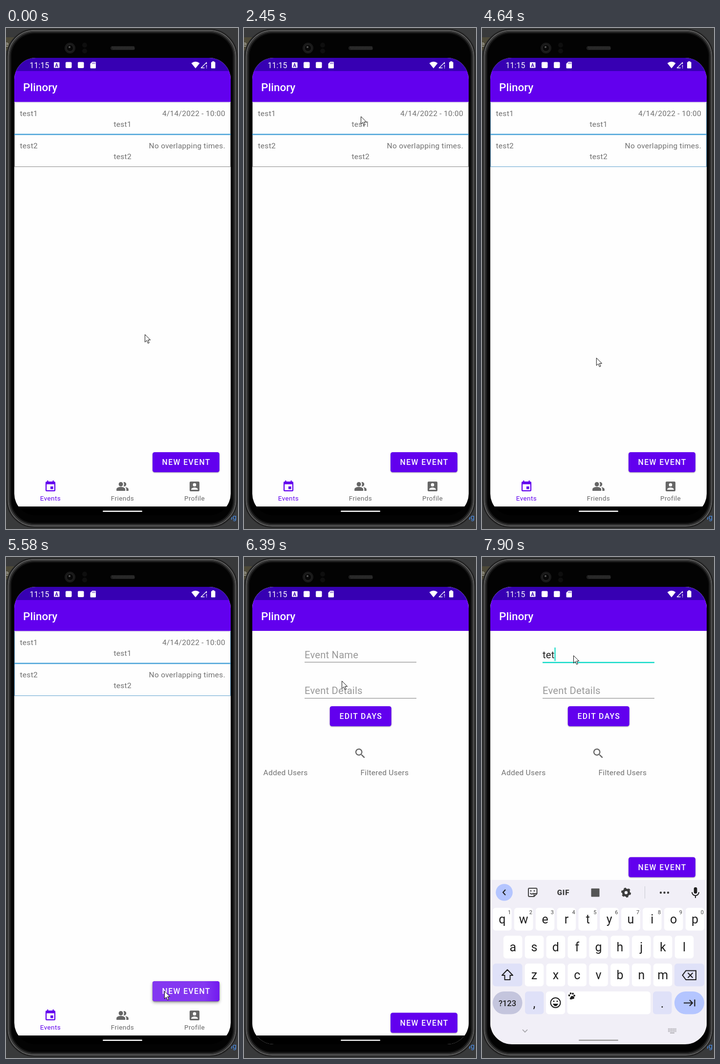
Animation of 475 by 1024 pixels, one loop 8000 ms. Source, as an HTML page:

```html
<!DOCTYPE html>
<html lang="en">
<head>
<meta charset="utf-8">
<title>Event planner demo</title>
<style>
html, body { margin: 0; width: 100%; height: 100%; overflow: hidden; background: #393a3b; }
svg { display: block; width: 475px; height: 1024px; font-family: Roboto, "Noto Sans", sans-serif; }
text { white-space: pre; }
.body { font-size: 15.5px; letter-spacing: .28px; fill: #717171; }
.title { font-size: 22.5px; font-weight: 500; fill: #fff; }
.field { font-size: 20.2px; letter-spacing: .2px; fill: #999; }
.caps { font-size: 15.8px; font-weight: 500; letter-spacing: 1.4px; fill: #fff; }
.tab { font-size: 13.5px; letter-spacing: .42px; text-anchor: middle; }
.key { font-size: 25px; text-anchor: middle; fill: #1f1f1f; }
.num { font-size: 11px; text-anchor: middle; fill: #444; }
.mid { text-anchor: middle; }
.end { text-anchor: end; }
</style>
</head>
<body>
<svg id="stage" viewBox="0 0 475 1024"></svg>
<script>
const LOOP = 8000;
const PURPLE = '#6200ee', DARK = '#3700b3', TEAL = '#03d8c4', INK = '#1f1f1f', GREY = '#666';
const APP = 'Plinory';

const rect = (x, y, w, h, fill, r = 0, more = '') =>
  `<rect x="${x}" y="${y}" width="${w}" height="${h}" rx="${r}" fill="${fill}" ${more}/>`;
const circle = (x, y, r, fill, more = '') => `<circle cx="${x}" cy="${y}" r="${r}" fill="${fill}" ${more}/>`;
const text = (x, y, s, cls, more = '') => `<text x="${x}" y="${y}" class="${cls}" ${more}>${s}</text>`;
const line = (d, color, w = 2, more = '') => `<path d="${d}" fill="none" stroke="${color}" stroke-width="${w}" ${more}/>`;
const shape = (d, fill, more = '') => `<path d="${d}" fill="${fill}" ${more}/>`;
const group = (id, s, more = '') => `<g id="${id}" ${more}>${s}</g>`;
const shadow = (dy, blur, color) => `style="filter:drop-shadow(0 ${dy}px ${blur}px ${color})"`;
// Icons are drawn on a 24 unit grid around their centre.
const icon = (x, y, d, fill) =>
  shape(d, fill, `fill-rule="evenodd" transform="translate(${x} ${y}) scale(1.12) translate(-12 -12)"`);

const ICON = {
  event: 'M17 12h-5v5h5zM16 1v2H8V1H6v2H5a2 2 0 0 0-2 2v14a2 2 0 0 0 2 2h14a2 2 0 0 0 2-2V5a2 2 0 0 0-2-2h-1V1zM19 19H5V8h14z',
  people: 'M16.7 13.1C18 14 19 15.3 19 17v3h4v-3c0-2.2-3.6-3.5-6.3-3.9zM15 12a4 4 0 1 0-1.3-7.8Q15 5.9 15 8t-1.3 3.8zM9 12a4 4 0 1 0 0-8 4 4 0 0 0 0 8zM9 13c-2.7 0-8 1.3-8 4v3h16v-3c0-2.7-5.3-4-8-4z',
  person: 'M5 3h14a2 2 0 0 1 2 2v14a2 2 0 0 1-2 2H5a2 2 0 0 1-2-2V5a2 2 0 0 1 2-2zM12 6a3 3 0 1 0 0 6 3 3 0 0 0 0-6zM6 17v1h12v-1c0-2-4-3.1-6-3.1s-6 1.1-6 3.1z',
  search: 'M15.5 14h-.8l-.3-.3A6.5 6.5 0 1 0 13.7 14.4l.3.3v.8l5 5 1.5-1.5zM9.5 14a4.5 4.5 0 1 1 0-9 4.5 4.5 0 0 1 0 9z'
};

const button = (x, y, w, s, overlay = '') =>
  rect(x, y, w, 41, PURPLE, 4.5, shadow(1, 1, '#0005')) + overlay +
  text(x + w / 2 + .7, y + 26.3, s, 'caps mid');

const topBar = () =>
  rect(17, 61, 443, 28, DARK) + rect(17, 88, 443, 63, PURPLE) + text(35, 129, APP, 'title');

function device() {
  const shell = (i, fill, stroke, w) =>
    rect(2 + i, 2.5 + i, 471 - 2 * i, 1018 - 2 * i, fill, 56 - i, `stroke="${stroke}" stroke-width="${w}"`);
  let grille = '';
  for (let x = 218; x < 262; x += 3) grille += line(`M${x} 38l2 6`, '#3d3d3d', 1);
  return rect(0, 0, 475, 1024, '#393a3b') + rect(0, 19, 20, 27, '#4d4938') +
    text(-2, 38, 'e', '', 'font-size="14" fill="#b9b9b0"') +
    text(460, 1005, 'ig', '', 'font-size="15" fill="#4c8ee6"') +
    shell(0, '#111', '#262626', 2) + shell(2.5, '#0b0b0b', '#777', 1.5) +
    shell(5, '#070707', '#353535', 3) + shell(8, '#030303', '#151515', 2) +
    circle(131, 41, 11, '#191919') + circle(131, 41, 7, '#080808', 'stroke="#2b2b2b"') +
    circle(130, 39, 2, '#555') + circle(161, 35, 5, '#0e0e0e') + circle(161, 47, 5, '#0e0e0e') +
    rect(214, 37, 50, 8, '#1f1f1f', 4) + grille;
}

function statusIcons() {
  const w = '#fff';
  return text(48.5, 81.5, '11:15', '', 'font-size="15.8" fill="#fff" letter-spacing=".15"') +
    rect(98, 70, 11.5, 11.5, w, 1) + text(103.7, 79.5, 'A', 'mid', `font-size="10" font-weight="700" fill="${DARK}"`) +
    rect(122, 69.5, 12.5, 12.5, w, 2) + rect(147, 69.5, 12.5, 12.5, w, 2) +
    shape('M176.5 69h6a1.5 1.5 0 0 1 1.5 1.5v10.500a1.5 1.5 0 0 1-1.5 1.5h-8.5a1.5 1.5 0 0 1-1.5-1.5v-8z', w) +
    line('M177 70.5v3M179.5 70.5v3M182 70.5v3', DARK, 1) +
    shape('M388 82.5L379.5 72Q388 65.5 396.5 72z', w) +
    line('M399 82L411 70M399 81.5h7.5M410.5 70v4', w, 1.3) + line('M410.5 76v3.5M410.5 80.7v1.5', w, 1.5) +
    rect(420, 69.5, 8.5, 13, w, 1.2) + rect(422.3, 68, 4, 3, w);
}

function home() {
  const row = (y, s, when) =>
    text(28.5, y, s, 'body') + text(449, y, when, 'body end') + text(238.7, y + 22, s, 'body mid');
  const tab = (x, d, s, color) => icon(x, 937, d, color) + text(x, 966, s, 'tab', `fill="${color}"`);
  const press = `<g clip-path="url(#btn)">${rect(300, 867, 137, 41, '#fff', 0, 'opacity=".08" id="hover"')}` +
    `${circle(324, 887, 0, 'url(#soft)', 'opacity=".15" id="ripple"')}</g>`;
  return rect(17, 61, 443, 917, '#fefefe') + topBar() +
    line('M17 152H460', '#b9a8dc', 1) +
    `<path id="edge" d="M17.5 152V283.500H459.500V152" fill="none"/>` +
    line('M17 217.5H460', '#4ba3d8', 2.6) +
    row(180, 'test1', '4/14/2022 - 10:00') + row(246, 'test2', 'No overlapping times.') +
    group('spin', circle(0, 0, 23, '#fcfcfc', shadow(1, 1.5, '#0005')) +
      line('M0-10.300A10.300 10.300 0 1 1-.01-10.300', '#08d6ef', 3, 'id="arc" pathLength="360"')) +
    group('lift', rect(300, 867, 137, 41, PURPLE, 4.5, shadow(3, 3, '#0005'))) +
    button(300, 867, 137, 'NEW EVENT', press) +
    tab(91, ICON.event, 'Events', PURPLE) + tab(238.5, ICON.people, 'Friends', GREY) + tab(386, ICON.person, 'Profile', GREY) +
    rect(17, 978, 443, 18, '#000');
}

function form() {
  return rect(17, 61, 443, 935, '#fefefe') + topBar() +
    text(124, 206.5, 'Event Name', 'field', 'id="name"') + rect(124, 214.5, 229, 1, '#777', 0, 'id="rule"') +
    rect(124, 185, 2, 27.5, TEAL, 0, 'id="caret"') +
    text(124, 280, 'Event Details', 'field') + rect(124, 288.3, 229, 1, '#777') +
    button(175.7, 305, 126, 'EDIT DAYS') + icon(238, 401.5, ICON.search, GREY) +
    text(39.5, 446, 'Added Users', 'body') + text(238.5, 446, 'Filtered Users', 'body') +
    group('save', button(300, 613.5, 137, 'NEW EVENT')) +
    rect(17, 978, 443, 18, '#000');
}

function keyboard() {
  const PALE = '#dfe1f8', BLUE = '#b4c5ff', PITCH = 43.86;
  const cap = (x, y, w, fill = '#fff', r = 6) => rect(x, y, w, 46.5, fill, r);
  const row = (letters, x, y) => [...letters].map((c, i) =>
    cap(x + i * PITCH - 19.3, y, 38.6) + text(x + i * PITCH, y + 31.5, c, 'key')).join('');
  const digits = [...'1234567890'].map((c, i) => text(56 + i * PITCH, 730, c, 'num')).join('');
  const toe = (x, y) => circle(x, y, 1.9, INK);
  const tools =
    circle(45.5, 685.5, 17.3, BLUE) + line('M48 680l-5 5.5 5 5.5', INK, 2) +
    line('M97 677h13.500a2 2 0 0 1 2 2v9l-6 6H97a2 2 0 0 1-2-2v-13a2 2 0 0 1 2-2zM112 688h-5.500v6M98.500 687q3.500 4 7 0', '#444', 2) +
    circle(100, 682.5, 1.4, '#444') + circle(107, 682.5, 1.4, '#444') +
    text(166.5, 691, 'GIF', 'mid', 'font-size="15" font-weight="900" letter-spacing=".8" fill="#3c3c3c"') +
    rect(223.5, 677.5, 17, 17, '#555', 1) +
    circle(295, 686, 5.7, 'none', 'stroke="#3c3c3c" stroke-width="5"') +
    circle(295, 686, 8.8, 'none', 'stroke="#3c3c3c" stroke-width="2.6" pathLength="48" stroke-dasharray="4 4"') +
    rect(333, 673, 1, 25, '#c9c9d1') + [366, 373.5, 381].map(x => circle(x, 686, 2.2, '#3c3c3c')).join('') +
    rect(433.8, 675, 6.6, 13, INK, 3.3) + line('M430 685a7 7 0 0 0 14 0M437 692v5', INK, 2);
  return rect(17, 660, 443, 336, '#f1eff7') + tools +
    row('qwertyuiop', 41.3, 717) + digits + row('asdfghjkl', 63.2, 774) + row('zxcvbnm', 107, 831) +
    cap(22, 831, 60.5, PALE) + line('M52 843.5l11 11.5h-5.5v9h-11v-9H41z', INK, 2, 'stroke-linejoin="round"') +
    cap(394, 831, 61, PALE) +
    line('M417.5 845.5H438v18.5h-20.5l-7-9.2zM421.5 850l10 10M431.5 850l-10 10', INK, 2) +
    cap(22, 888, 60.5, '#c4c5dd', 23) + text(52, 918, '?123', 'mid', 'font-size="16.5" font-weight="500" fill="#222"') +
    cap(88, 888, 38.5, PALE) + text(107, 921, ',', 'key') +
    cap(131, 888, 39) + circle(150.5, 911, 10, 'none', `stroke="${INK}" stroke-width="2"`) +
    circle(147, 908, 1.6, INK) + circle(154, 908, 1.6, INK) + shape('M145 913h11q-2 5-5.5 5t-5.5-5z', INK) +
    cap(174.5, 888, 170.5) + toe(178.5, 896) + toe(181.5, 892) + toe(186, 892.5) + toe(189, 896.5) +
    shape('M179.5 903q3-7 5-6 5 1 4.5 5-2 2-4.5 1.5-3 2-5-.5z', INK) +
    cap(350, 888, 38.5, PALE) + text(369, 921, '.', 'key') +
    cap(394, 888, 61, BLUE, 23) + line('M413 911.5h18M425 905.5l6 6-6 6M435.5 904.5v14', INK, 2.2);
}

function navIcons() {
  let dots = '';
  for (let i = 0; i < 21; i++) dots += rect(381 + i % 7 * 2.5, 963.5 + Math.floor(i / 7) * 2.7, 1.6, 1.7, '#444');
  return line('M83 966l5 5 5-5', '#444', 1.7) + dots + rect(385, 972, 9, 1.5, '#444');
}

document.getElementById('stage').innerHTML =
  `<defs><clipPath id="screen">${rect(17, 61, 443, 935, '#000', 44)}</clipPath>
   <clipPath id="btn">${rect(300, 867, 137, 41, '#000', 4.5)}</clipPath>
   <radialGradient id="soft"><stop offset=".7" stop-color="#fff"/><stop offset="1" stop-color="#fff" stop-opacity="0"/></radialGradient></defs>` +
  device() +
  group('view', group('home', home()) + group('form', form()) + statusIcons() +
    group('keys', keyboard()) + group('nav', navIcons()) +
    rect(198, 986.5, 81, 2.4, '#fff', 1.2, 'id="pill"'), 'clip-path="url(#screen)"') +
  group('mouse', shape('M.5.5V16L4.2 12.6 6.7 18.5 9.2 17.4 6.7 11.7H11.7z', '#fff', 'stroke="#111"'));

// Turning points of the pointer: time, x, y.
const PATH = [
  [1330, 284, 626], [1690, 204, 448], [1930, 237, 328], [2090, 237, 328], [2330, 239, 160], [2720, 239, 199],
  [2900, 239, 199], [3650, 250, 439], [4250, 285, 365], [4490, 151, 455], [4920, 294, 833], [5430, 324, 887],
  [5650, 324, 887], [5850, 266, 517], [6760, 187, 201]];

const ramp = (t, a, b) => Math.min(1, Math.max(0, (t - a) / (b - a)));
const ease = u => 1 - (1 - u) ** 2;
const mix = (a, b, u) => a + (b - a) * u;
const el = id => document.getElementById(id);
const set = (id, attrs) => { for (const k in attrs) el(id).setAttribute(k, attrs[k]); };

function pointer(t) {
  const i = PATH.findIndex(p => p[0] > t);
  if (i < 1) return i ? PATH.at(-1).slice(1) : PATH[0].slice(1);
  const [a, ax, ay] = PATH[i - 1], [b, bx, by] = PATH[i];
  const u = ease(ramp(t, a, b));
  return [mix(ax, bx, u), mix(ay, by, u)];
}

function drawSpinner(t) {
  const pull = ease(ramp(t, 3100, 3530)), settle = ramp(t, 3530, 3650);
  const scale = t < 3150 ? 0 : 1 - ramp(t, 3980, 4140);
  const sweep = Math.max(20, 275 * pull - 15 * settle - .55 * Math.max(0, t - 3650));
  set('spin', { transform: `translate(238.5 ${mix(mix(185, 217, pull), 201, settle)}) scale(${scale})` });
  set('arc', { transform: `rotate(${-40 + .75 * (t - 3650)})`, 'stroke-dasharray': `${sweep} 360`, opacity: pull });
}

function drawForm(t) {
  const focus = t >= 6910, name = el('name');
  const typed = 'tet'.slice(0, Math.max(0, Math.ceil((t - 7495) / 165)));
  const label = typed || 'Event Name';
  if (name.textContent !== label) name.textContent = label;
  set('form', { transform: `translate(0 ${t < 6000 ? 86 : 0})`, opacity: ramp(t, 5690, 5790) });
  set('name', { style: `fill:${typed ? '#222' : '#999'}` });
  set('rule', { height: focus ? 2.3 : 1, fill: focus ? TEAL : '#777' });
  set('caret', { x: typed ? 124 + name.getComputedTextLength() : 124, opacity: +focus });
  set('save', { transform: `translate(0 ${t < 7150 ? 318 : 0})` });
}

function draw(t) {
  set('mouse', { transform: `translate(${pointer(t)})` });
  set('edge', { stroke: t < 3170 ? '#8b8b8b' : '#62a3cf' });
  drawSpinner(t);

  const hover = +(t >= 5000);
  set('hover', { visibility: hover ? 'visible' : 'hidden' });
  set('lift', { opacity: hover });
  set('ripple', { r: 128 * ease(ramp(t, 5380, 5650)) });
  drawForm(t);

  const rise = ease(ramp(t, 7050, 7280));
  set('keys', { transform: `translate(0 ${336 * (1 - rise)})`, opacity: rise });
  set('nav', { opacity: .45 * ramp(t, 7300, 7900) });
  const v = Math.round(255 - 35 * (ramp(t, 5790, 5850) - ramp(t, 6000, 6700)) - 98 * ramp(t, 7250, 7900));
  set('pill', { fill: `rgb(${v},${v},${v})` });
}

const start = performance.now();
function tick() {
  draw((performance.now() - start) % LOOP);
  requestAnimationFrame(tick);
}
tick();
</script>
</body>
</html>
```
